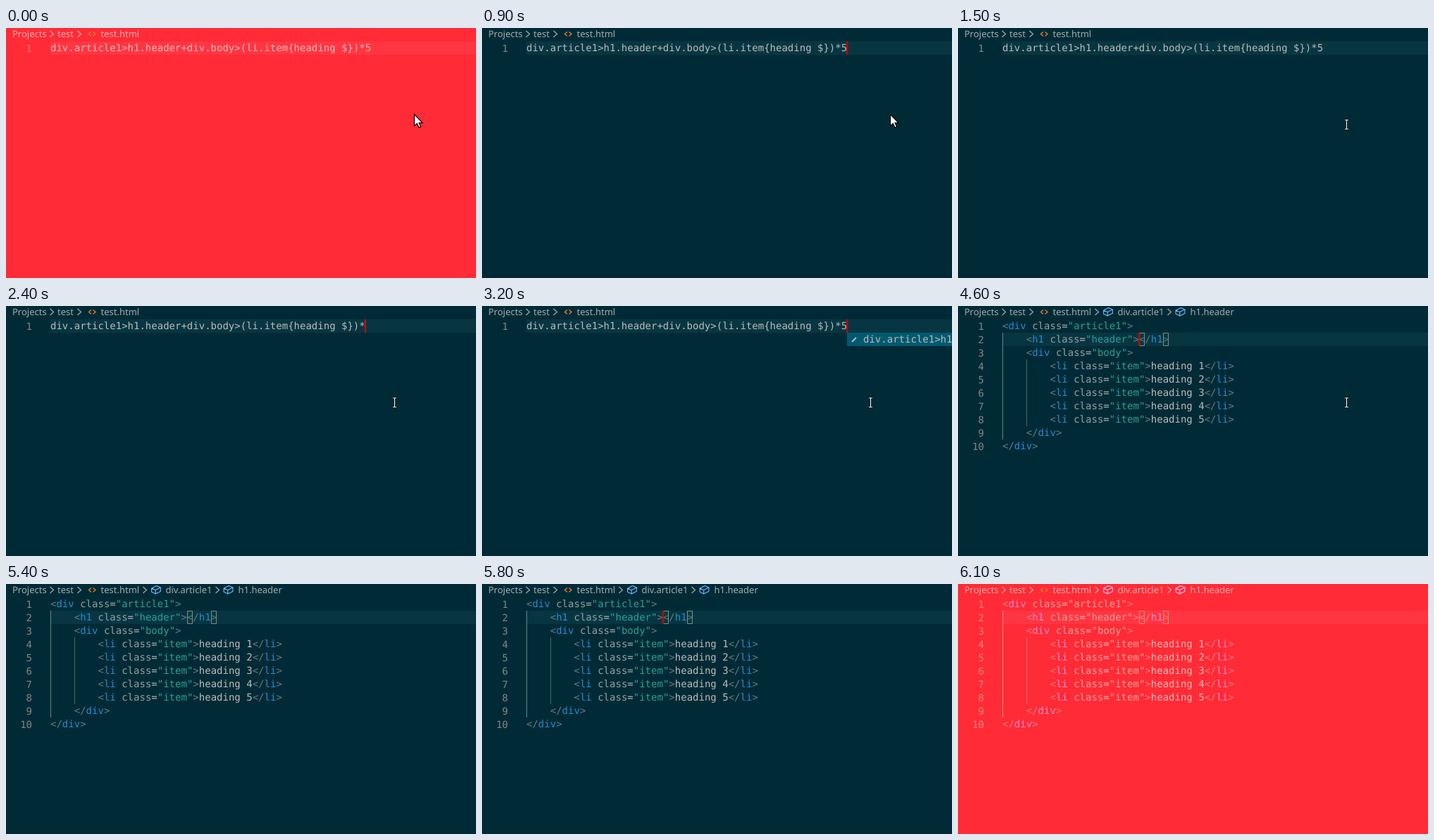
These frames come from a looping animation (667x356 px, 6.3 s). An HTML page:

```html
<!DOCTYPE html>
<html lang="en">
<head>
<meta charset="utf-8">
<title>Abbreviation expansion</title>
<style>
html, body { margin: 0; width: 100%; height: 100%; overflow: hidden; background: #002b36; }
svg { display: block; width: 667px; height: 356px; }
text { white-space: pre; text-rendering: geometricPrecision; }
.mono { font: 14px "DejaVu Sans Mono", monospace; fill: #bbb; }
.mono .num { fill: #858585; text-anchor: end; }
.mono .punct { fill: #657b83; }
.mono .tag { fill: #268bd2; }
.mono .attr { fill: #93a1a1; }
.mono .str { fill: #2aa198; }
.crumb { font: 13px "Noto Sans", sans-serif; fill: #a3acae; }
.line { fill: none; stroke: #a3acae; stroke-width: 1.2; }
.cube { fill: none; stroke: #75beff; stroke-width: 1.1; stroke-linejoin: round; }
#flash { fill: #f00; mix-blend-mode: screen; }
</style>
</head>
<body>
<svg viewBox="0 0 667 356">
  <defs>
    <path id="chevron" class="line" d="M0 4l5 4.5-5 4.5"/>
    <path id="cube" class="cube" d="M.6 6.2L7.6 2.6 13.4 5v5.4L6.2 14 .6 11.2zL6.2 8.6 13.4 5M6.2 8.6V14"/>
    <path id="beam" d="M-2.5-6.5h2l.5.5.5-.5h2M0-6V6M-2.5 6.5h2L0 6l.5.5h2"/>
  </defs>
  <rect width="667" height="356" fill="#002b36"/>
  <rect id="current" x="63" width="604" height="19" fill="#073642"/>

  <g class="crumb">
    <text x="9" y="13">Projects</text>
    <text x="73" y="13">test</text>
    <text x="134.5" y="13">test.html</text>
    <use href="#chevron" x="62.5"/>
    <use href="#chevron" x="101.5"/>
    <path d="M121 5.5L117.5 8.5 121 11.5M123.5 5.5L127 8.5 123.5 11.5" fill="none" stroke="#e37933" stroke-width="1.4"/>
    <g id="symbols">
      <use href="#chevron" x="194.5"/>
      <use href="#cube" x="206"/>
      <text x="226.5" y="13">div.article1</text>
      <use href="#chevron" x="297.5"/>
      <use href="#cube" x="308.5"/>
      <text x="329.5" y="13">h1.header</text>
    </g>
  </g>

  <g class="mono">
    <g id="source">
      <text class="num" x="37" y="34">1</text>
      <text id="abbr" x="63" y="33"></text>
    </g>
    <g id="popup">
      <rect x="518" y="38" width="149" height="19" fill="#005a6f"/>
      <text x="541" y="52">div.article1>h1</text>
      <path d="M525 51l6-6" stroke="#bbb" stroke-width="2"/>
    </g>
    <g id="result">
      <path d="M63.5 38V190" stroke="#62868c"/>
      <path d="M97.5 76V171" stroke="#4a666c"/>
    </g>
  </g>
  <path id="match" d="M257.5 38.5h7v18h-7zM291.5 38.5h7v18h-7z" fill="#006400" fill-opacity=".1" stroke="#888"/>
  <rect id="caret" width="2" height="19" fill="#d30102"/>
  <rect id="flash" width="667" height="356"/>

  <path id="arrow" d="M579.5 123v16.5l3.8-3.4 2.7 5.7 2.6-1.2-2.6-5.5h5z" fill="#fff" stroke="#000" stroke-width="1.2"/>
  <g id="ibeam" fill="none">
    <use href="#beam" stroke="#000" stroke-width="3"/>
    <use href="#beam" stroke="#fff" stroke-width="1.2"/>
  </g>
</svg>
<script>
const LOOP = 6300;
const abbreviation = "div.article1>h1.header+div.body>(li.item{heading $})*5";
const el = id => document.getElementById(id);
const show = (id, on) => el(id).setAttribute("visibility", on ? "visible" : "hidden");
const put = (id, attrs) => {
  for (const key in attrs) el(id).setAttribute(key, attrs[key]);
};

function add(parent, name, attrs, content = "") {
  const node = document.createElementNS("http://www.w3.org/2000/svg", name);
  for (const key in attrs) node.setAttribute(key, attrs[key]);
  node.textContent = content;
  return parent.appendChild(node);
}

function classOf(token, inTag) {
  if (/^[<>]/.test(token)) return "punct";
  if (!inTag || token === "=") return "";
  if (token[0] === '"') return "str";
  return token === "class" ? "attr" : "tag";
}

function addCode(line, row) {
  const y = 33 + row * 19;
  add(el("result"), "text", { class: "num", x: 37, y: y + 1 }, row + 1);
  const text = add(el("result"), "text", { x: 63, y });
  let inTag = false;
  for (const token of line.match(/<\/?|>|"[^"]*"|=|\s+|[^<>="\s]+/g)) {
    if (token[0] === "<") inTag = true;
    add(text, "tspan", { class: classOf(token, inTag) }, token);
    if (token === ">") inTag = false;
  }
}

const pad = n => " ".repeat(n * 4);
[
  '<div class="article1">',
  pad(1) + '<h1 class="header"></h1>',
  pad(1) + '<div class="body">',
  ...[1, 2, 3, 4, 5].map(n => `${pad(2)}<li class="item">heading ${n}</li>`),
  pad(1) + "</div>",
  "</div>"
].forEach(addCode);

// Each pair holds a start and an end time.
const caretOn = [[900, 1500], [2000, 3000], [3200, 4100], [4600, 5100], [5600, 6100]];

function draw(t) {
  const within = (from, to) => t >= from && t < to;
  const expanded = t >= 3600;
  const deleted = within(2400, 3200);

  show("flash", t < 900 || t >= 6100);
  show("source", !expanded);
  show("result", expanded);
  show("popup", within(3200, 3600));
  show("match", t >= 3700);
  show("symbols", t >= 3900);
  el("abbr").textContent = deleted ? abbreviation.slice(0, -1) : abbreviation;

  const y = expanded ? 38 : 19;
  put("current", { y });
  put("caret", { x: expanded ? 256 : deleted ? 509 : 517, y });
  show("caret", caretOn.some(span => within(...span)));

  show("arrow", t < 1000);
  show("ibeam", within(1000, 4700));
  const step = Math.max(0, Math.min(3, Math.floor(t / 100) - 12));
  put("ibeam", { transform: `translate(${581.5 - step * 10} 137.5)` });
}

const start = performance.now();
function tick() {
  draw((performance.now() - start) % LOOP);
  requestAnimationFrame(tick);
}
tick();
</script>
</body>
</html>
```
